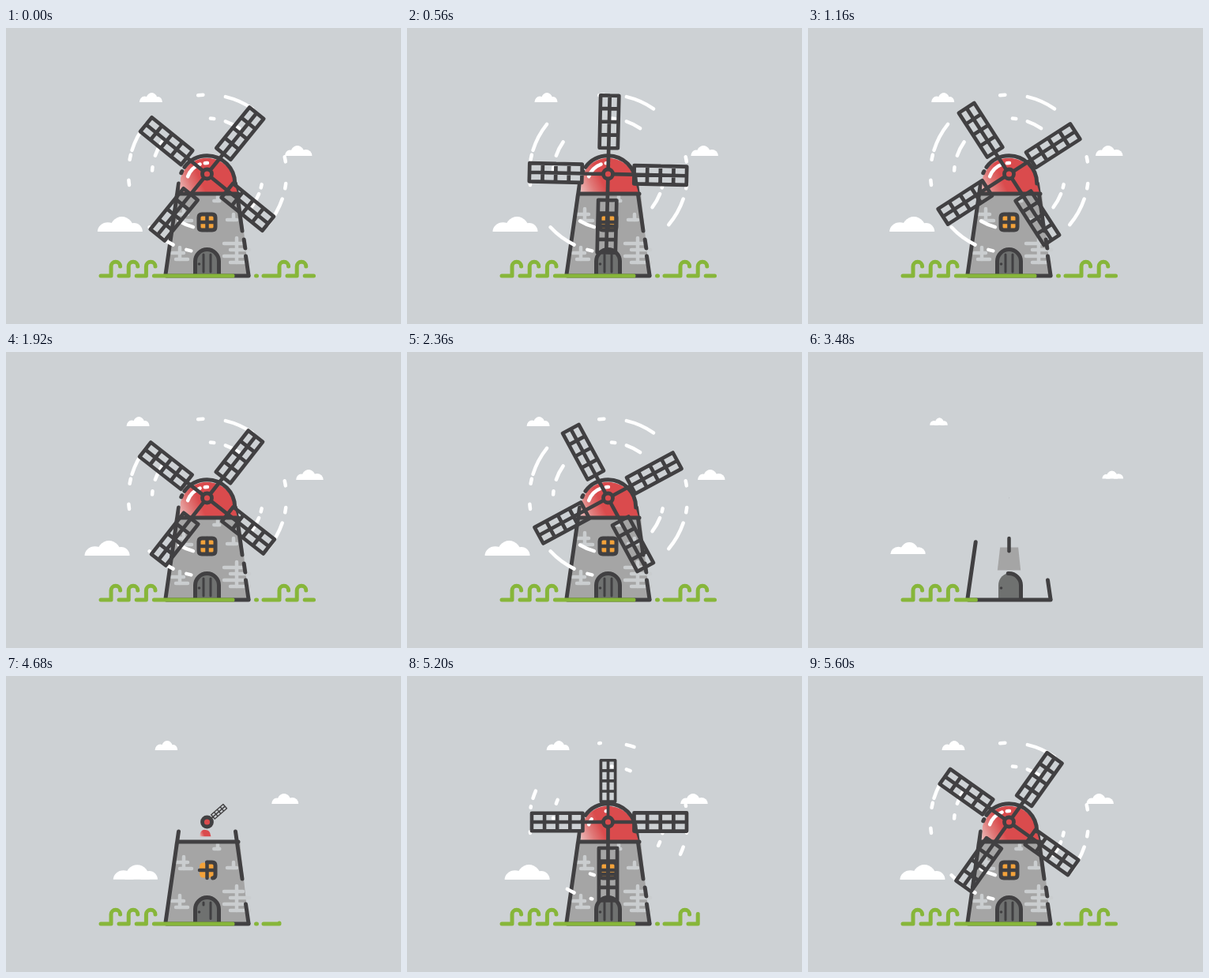
Recreate the animation shown at these times as an HTML page with a canvas. Size 500x375 px, loop 5640 ms.

```html
<!DOCTYPE html>
<html lang="en">
<head>
<meta charset="utf-8">
<title>Windmill</title>
<style>
  html, body { margin: 0; width: 100%; height: 100%; overflow: hidden; background: #cdd1d4; }
  canvas { display: block; width: 500px; height: 375px; }
</style>
</head>
<body>
<canvas id="stage"></canvas>
<script>
const LOOP = 5640, BUILD = 3800, GROUND = 314, MID = 254.5;
const DARK = '#414042', GREEN = '#87b63a', RED = '#da4b4d', STONE = '#a5a5a5',
      BRICK = '#cacdcf', AMBER = '#f3a23a', DOOR = '#6f7170', SKY = '#cdd1d4';

const canvas = document.getElementById('stage');
const ctx = canvas.getContext('2d');
const ratio = window.devicePixelRatio || 1;
canvas.width = 500 * ratio;
canvas.height = 375 * ratio;

let time = 0;   // runs from BUILD to BUILD + LOOP
let clock = 0;  // building time: runs forward, then quickly back to take all apart

const rad = deg => deg * Math.PI / 180;
const ramp = (t, start, span) => Math.min(1, Math.max(0, (t - start) / span));
const easeOut = p => 1 - (1 - p) ** 3;
const drawn = (start, span = 300) => ramp(clock, start, span);
const grown = (start, span = 300) => easeOut(drawn(start, span));

function stroke(path, length, p, color = DARK, width = 5) {
  if (p <= 0) return;
  ctx.strokeStyle = color;
  ctx.lineWidth = width;
  ctx.setLineDash(p < 1 ? [length * p, 9999] : []);
  ctx.stroke(path);
  ctx.setLineDash([]);
}

function line(x1, y1, x2, y2, p, color, width) {
  const path = new Path2D();
  path.moveTo(x1, y1);
  path.lineTo(x2, y2);
  stroke(path, Math.hypot(x2 - x1, y2 - y1), p, color, width);
}

function arc(x, y, r, from, to, p, color, width) {
  const path = new Path2D();
  path.arc(x, y, r, rad(from), rad(to), to < from);
  stroke(path, r * rad(Math.abs(to - from)), p, color, width);
}

function fill(path, color) {
  ctx.fillStyle = color;
  ctx.fill(path);
}

function disc(x, y, r) {
  const path = new Path2D();
  path.arc(x, y, r, 0, 2 * Math.PI);
  return path;
}

function scaled(x, y, s, draw) {
  if (s <= 0.01) return;
  ctx.save();
  ctx.translate(x, y);
  ctx.scale(s, s);
  ctx.translate(-x, -y);
  draw();
  ctx.restore();
}

// A cloud is three half ellipses on a flat base; a negative drift mirrors it.
function drawCloud(x, base, w, h, drift) {
  x += drift * (Math.max(0, 9080 - time) * 0.00076) ** 3;
  scaled(x + w / 2, base - h / 2, grown(4000, 900), () => {
    for (const [at, size, tall] of [[0.23, 0.23, 0.62], [0.54, 0.28, 1], [0.81, 0.19, 0.58]]) {
      const puff = new Path2D();
      puff.ellipse(x + w * (drift < 0 ? 1 - at : at), base, size * w, tall * h, 0, Math.PI, 0);
      fill(puff, '#fff');
    }
  });
}

// Ground from x to end, broken by curled tufts that rise at even steps.
function drawGrass(x, firstTuft, tufts, end, p) {
  const curl = 12 + Math.PI * 5.8;
  const parts = [];
  for (let i = 0; i < tufts; i++) {
    const rise = firstTuft + 22.2 * i;
    parts.push({ from: x, to: rise, curl });
    x = rise + 10;
  }
  parts.push({ from: x, to: end, curl: 0 });

  const size = part => part.to - part.from + part.curl;
  let left = p * parts.reduce((sum, part) => sum + size(part), 0);
  for (const part of parts) {
    const path = new Path2D();
    path.moveTo(part.from, GROUND);
    path.lineTo(part.to, GROUND);
    if (part.curl) {
      path.lineTo(part.to, 302);
      path.arc(part.to + 5.8, 302, 5.8, Math.PI, 2 * Math.PI);
    }
    stroke(path, size(part), Math.min(1, left / size(part)), GREEN);
    left -= size(part);
  }
}

// Rows of joints, shifted in turn, with one upright joint through them.
function drawBricks(x, y, w, rows) {
  const p = drawn(4400, 260);
  for (let i = 0; i < rows; i++) {
    const shift = i % 2 ? w / 6 : -w / 6;
    line(x - w / 2 + shift, y + 8 * i, x + w / 2 + shift, y + 8 * i, p, BRICK, 4.5);
  }
  line(x, y - 7, x, y + 8 * (rows - 1), p, BRICK, 4.5);
}

function drawTower() {
  scaled(MID, 262, grown(4320, 330), () => {
    fill(new Path2D('M214 210H296L307 314H202Z'), STONE);
  });
  drawBricks(225, 236, 15, 2);
  drawBricks(220, 285, 15, 2);
  drawBricks(288, 243, 12, 1);
  drawBricks(268, 219, 7, 1);
  drawBricks(292, 273, 24, 4);

  line(202, 312, 218.5, 197, drawn(4150, 330));
  line(307, 313, 303.5, 289, drawn(4050));
  line(302.8, 279, 301.2, 268, drawn(4850));
  line(299, 257, 290.5, 197, drawn(4380));
}

function drawWindow() {
  scaled(MID, 246, grown(4520), () => {
    const panes = new Path2D();
    panes.roundRect(244, 235.5, 21, 21, 5);
    fill(panes, AMBER);
  });
  line(MID, 236, MID, 256, drawn(4110), DARK, 4.5);
  line(245, 246, 264, 246, drawn(4380), DARK, 4.5);
  const frame = new Path2D('M254.5 236H261Q265 236 265 240V252Q265 256 261 256H248Q244 256 244 252V240Q244 236 248 236Z');
  stroke(frame, 76, drawn(4560), DARK, 5);
}

function drawDoor() {
  scaled(MID, GROUND, grown(4050), () => {
    fill(new Path2D('M241 314V296A13.5 15 0 0 1 270 296V314Z'), DOOR);
    fill(disc(244.5, 299, 1.8), DARK);
  });
  line(259, 287, 259, 309, drawn(4400), DARK, 3);
  line(250, 287, 250, 309, drawn(4640), DARK, 3);
  stroke(new Path2D('M269.5 312V295.5A15 15 0 0 0 239.5 295.5V312'), 80, drawn(4200), DARK, 5);
}

// A ring of wind: long and short dashes around the given angles.
function drawWind(r, half, longs, shorts) {
  const p = drawn(5100, 380);
  const dash = (at, h) => arc(255, 184.5, r, at - h, at + h, p, '#fff', 4.5);
  for (const at of longs) dash(at, half);
  for (const at of shorts) dash(at, 1.8);
}

function drawCap() {
  scaled(251.5, 202, grown(4640, 600), () => {
    const shade = ctx.createLinearGradient(220, 204, 246, 192);
    shade.addColorStop(0, '#ecb6b4');
    shade.addColorStop(0.5, '#e07a79');
    shade.addColorStop(1, RED);
    fill(new Path2D('M220 209L221 190A35 35 0 0 1 289.5 197L293 209Z'), shade);
  });
  const shine = drawn(5100);
  arc(MID, 197, 26, 200, 250, shine, '#fff', 4.5);
  arc(MID, 197, 26, 264, 271, shine, '#fff', 4.5);
  const edge = drawn(4800, 400);
  arc(MID, 197, 35.3, 360, 216, edge);
  arc(MID, 197, 35.3, 206, 202, edge);
  line(218, 210, 294, 210, drawn(4400, 260));
}

// Steady turn that starts gently and comes to rest.
function sailAngle() {
  const s = (time - 5640) / 1000;
  if (s > 1.92) return 218 + 27.5 * easeOut(ramp(s, 1.92, 0.92));
  return 39 + 93.2 * s + (s < 0 ? 10 * s * s : 0);
}

function sailPath() {
  const half = 11.6, inner = 33, outer = 99.5, rows = 4;
  const path = new Path2D();
  path.rect(inner, -half, outer - inner, 2 * half);
  path.moveTo(8, 0);
  path.lineTo(outer, 0);
  for (let i = 1; i < rows; i++) {
    const x = inner + (outer - inner) * i / rows;
    path.moveTo(x, -half);
    path.lineTo(x, half);
  }
  return path;
}
const sail = sailPath();

function drawSails() {
  for (let i = 0; i < 4; i++) {
    const fold = ramp(time, 8250 + 150 * i, 230);
    const s = easeOut(ramp(time, 4630 + 130 * i, 450)) * (1 - fold * fold);
    if (s <= 0.01) continue;
    ctx.save();
    ctx.translate(MID, 185);
    ctx.rotate(rad(sailAngle() + 90 * i));
    ctx.scale(s, s);
    stroke(sail, 0, 1, DARK, 4.7);
    ctx.restore();
  }
  scaled(MID, 185, grown(4352, 320), () => {
    const hub = disc(MID, 185, 6);
    fill(hub, RED);
    stroke(hub, 0, 1, DARK, 4.8);
  });
}

function render(now) {
  const t = now % LOOP;
  time = t < BUILD ? t + LOOP : t;
  clock = Math.min(time, 4356 + 1.8 * (9120 - time));

  ctx.setTransform(ratio, 0, 0, ratio, 0, 0);
  ctx.lineCap = ctx.lineJoin = 'round';
  ctx.fillStyle = SKY;
  ctx.fillRect(0, 0, 500, 375);

  drawCloud(151, 94, 29, 12, 1);
  drawCloud(98, 258, 57, 19, 1);
  drawCloud(368.5, 162, 34.5, 13, -0.87);
  drawTower();
  drawWindow();
  drawDoor();
  line(307, GROUND, 203, GROUND, drawn(3820));
  drawGrass(120, 133, 3, 287, drawn(3850, 750));
  line(316.5, GROUND, 317.5, GROUND, drawn(4400, 100), GREEN);
  drawGrass(326, 346, 2, 389.5, drawn(4480, 1000));
  drawWind(100, 10.8, [29.5, 126.5, 208, 294], [9, 103.7, 173.5, 192, 265, 349.5]);
  drawWind(70, 8, [29.5, 113, 207, 297], [13, 185, 275]);
  drawCap();
  drawSails();
}

const start = performance.now();
function tick() {
  render(performance.now() - start);
  requestAnimationFrame(tick);
}
tick();
</script>
</body>
</html>
```
